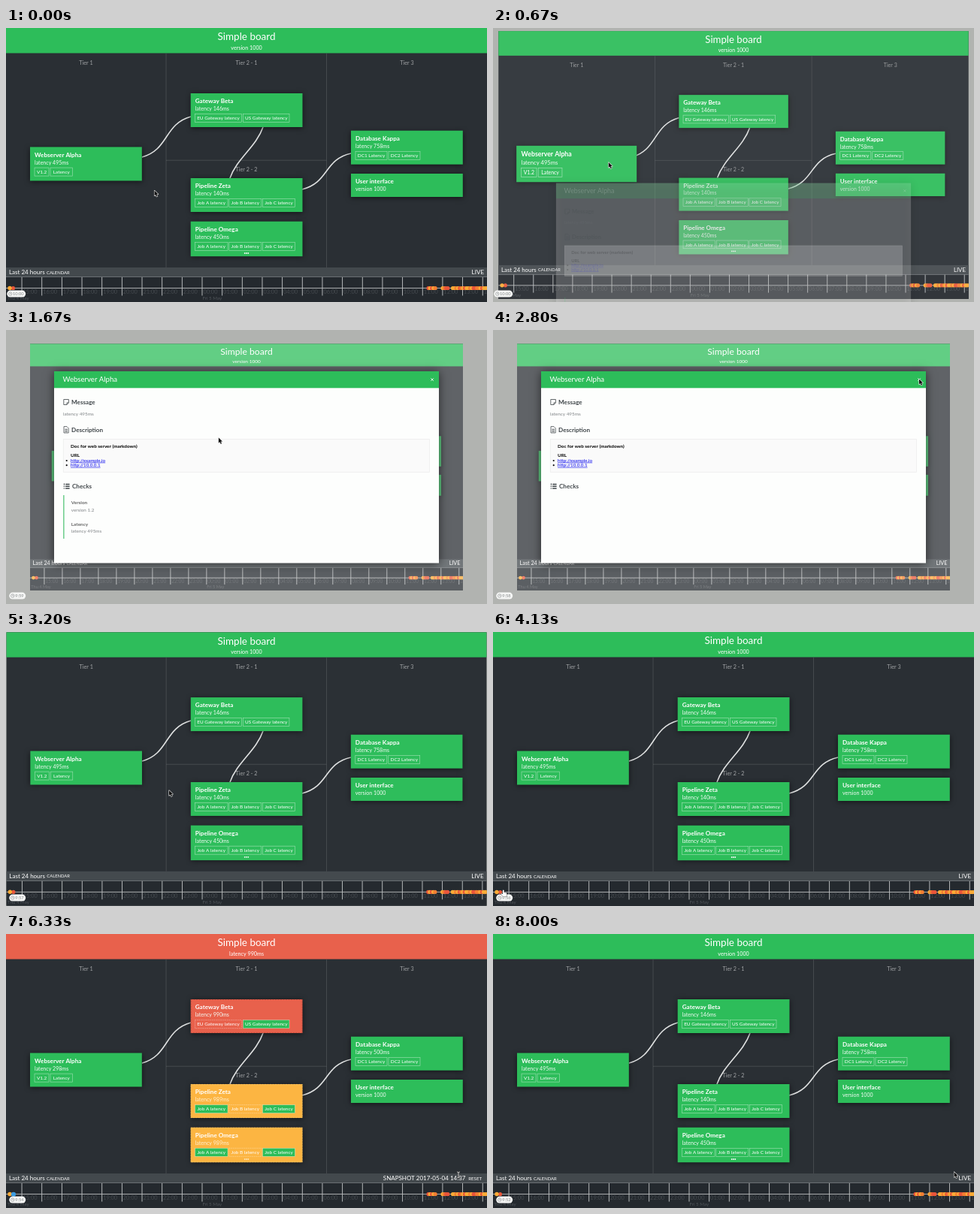
These frames come from a looping animation (640x365 px, 8.07 s). An HTML page with a canvas:

```html
<!DOCTYPE html>
<html lang="en">
<head>
<meta charset="utf-8">
<title>Simple board</title>
<style>
html, body { margin: 0; width: 100%; height: 100%; overflow: hidden; background: #b1b3b0; }
canvas { display: block; width: 640px; height: 365px; }
</style>
</head>
<body>
<canvas id="stage"></canvas>
<script>
const W = 640, H = 365, LOOP = 8070;
const OPEN = 587, CLOSE = 2815, PICK = 4420, RESET = 7060;
const HOVER_IN = 300, HOVER_OUT = 1150, CHECKS_OUT = 2700;
const OPEN_TIME = 500, CLOSE_TIME = 450, FADE = 250;
const GREEN = [45, 189, 90], RED = [232, 97, 76], AMBER = [252, 181, 66];
const SANS = 'Lato, sans-serif';

const canvas = document.getElementById('stage');
const ratio = window.devicePixelRatio || 1;
canvas.width = W * ratio;
canvas.height = H * ratio;
const c = canvas.getContext('2d');

const clamp = v => Math.max(0, Math.min(1, v));
const mix = (a, b, p) => a + (b - a) * p;
const rgb = a => `rgb(${a.join(',')})`;
const blend = (a, b, p) => rgb(a.map((v, i) => Math.round(mix(v, b[i], p))));
const smooth = p => p * p * (3 - 2 * p);

// cubic-bezier(.25, .1, .25, 1)
function ease(x) {
  if (x <= 0) return 0;
  if (x >= 1) return 1;
  const curve = (u, a, b) => 3 * u * (1 - u) * (1 - u) * a + 3 * u * u * (1 - u) * b + u * u * u;
  let lo = 0, hi = 1;
  for (let i = 0; i < 20; i++) {
    const mid = (lo + hi) / 2;
    if (curve(mid, .25, .25) < x) lo = mid; else hi = mid;
  }
  return curve(lo, .1, 1);
}

// Eased switch: rises from 0 to 1 at `on`, falls back at `off`
const toggle = (t, on, off, rise, fall = rise) =>
  t < off ? ease((t - on) / rise) : 1 - ease((t - off) / fall);

function scaled(s, x, y, draw) {
  c.save();
  c.translate(x, y);
  c.scale(s, s);
  c.translate(-x, -y);
  draw();
  c.restore();
}

function rect(x, y, w, h, color) {
  c.fillStyle = color;
  c.fillRect(x, y, w, h);
}

function text(s, x, y, size, color = '#fff', { bold = false, align = 'left', family = SANS } = {}) {
  c.font = `${bold ? 'bold ' : ''}${size}px ${family}`;
  c.textAlign = align;
  c.textBaseline = 'alphabetic';
  c.fillStyle = color;
  c.fillText(s, x, y);
}

function pathLine(d, color, width) {
  c.strokeStyle = color;
  c.lineWidth = width;
  c.stroke(new Path2D(d));
}

function dot(x, y, r, color) {
  c.fillStyle = color;
  c.beginPath();
  c.arc(x, y, r, 0, 7);
  c.fill();
}

function shadowed(blur, alpha, draw) {
  c.save();
  c.shadowColor = `rgba(0,0,0,${alpha})`;
  c.shadowBlur = blur * ratio;
  c.shadowOffsetY = ratio;
  draw();
  c.restore();
}

// Tags: [label, x, width, snapshot colour]
const jobs = [['Job A latency', 251.5, 43.5, GREEN], ['Job B latency', 296.8, 43, AMBER], ['Job C latency', 341.5, 43, GREEN]];
const cards = [
  { name: 'Webserver Alpha', x: 32, y: 158.5, h: 45, live: 'latency 495ms', past: 'latency 298ms', tone: GREEN,
    tags: [['V1.2', 38, 19, GREEN], ['Latency', 59, 29.5, GREEN]] },
  { name: 'Gateway Beta', x: 245.7, y: 87, h: 45, live: 'latency 146ms', past: 'latency 990ms', tone: RED,
    tags: [['EU Gateway latency', 251.5, 62, RED], ['US Gateway latency', 315.5, 61.5, GREEN]] },
  { name: 'Pipeline Zeta', x: 245.7, y: 200, h: 45, live: 'latency 140ms', past: 'latency 989ms', tone: AMBER, tags: jobs },
  { name: 'Pipeline Omega', x: 245.7, y: 257.7, h: 46.5, live: 'latency 450ms', past: 'latency 989ms', tone: AMBER, tags: jobs, more: true },
  { name: 'Database Kappa', x: 459, y: 136.7, h: 45, live: 'latency 758ms', past: 'latency 500ms', tone: GREEN,
    tags: [['DC1 Latency', 465, 42, GREEN], ['DC2 Latency', 509, 42, GREEN]] },
  { name: 'User interface', x: 459, y: 194, h: 31, live: 'version 1000', past: 'version 1000', tone: GREEN, tags: [] }
];

function drawCard(card, past, p) {
  const { x, y, h, tone } = card, alert = tone !== GREEN && past;
  shadowed(7, .6, () => rect(x, y, 148.8, h, blend(GREEN, tone, p)));
  if (alert) {
    c.setLineDash([2, 1.5]);
    c.strokeStyle = tone === RED ? 'rgba(130,45,40,.65)' : 'rgba(255,225,160,.5)';
    c.lineWidth = .6;
    c.strokeRect(x + .3, y + .3, 148.2, h - .6);
    c.setLineDash([]);
  }
  text(card.name, x + 6, y + 13.4, 8.15, '#fff', { bold: true });
  text(past ? card.past : card.live, x + 6, y + 23.4, 7.05, alert && tone === AMBER ? '#fff0d2' : '#f2fbf5');
  for (const [label, tx, w, color] of card.tags) {
    const ty = y + 27.6;
    if (tone !== GREEN) rect(tx, ty, w, 11, blend(GREEN, color, p));
    if (alert && color !== GREEN) c.setLineDash([1.5, 1]);
    c.strokeStyle = 'rgba(255,255,255,.55)';
    c.lineWidth = .6;
    c.strokeRect(tx, ty, w, 11);
    c.setLineDash([]);
    text(label, tx + w / 2, ty + 7.8, 6.4, '#fff', { align: 'center' });
  }
  if (card.more) for (let i = -1; i < 2; i++) dot(320 + i * 2.3, y + 42.3, .9, alert ? '#ffe7ba' : '#fff');
}

function drawTimeline(past) {
  rect(0, 319, W, 12.5, '#43494d');
  rect(0, 331.5, W, 33.5, '#24292e');
  rect(0, 331.3, W, .7, '#858a8d');
  for (let i = 0; i < 24; i++) {
    const x = 21 + i * 26.66;
    text(`${(15 + i) % 24}`.padStart(2, '0') + ':00', x + 1.5, 354, 7.4, '#454a4f');
    rect(x - .4, 332, .9, 24.5, '#c3c6c7');
  }
  text('Thu 4 May', 1.5, 362.3, 6.2, '#50555a');
  text('Fri 5 May', 261.5, 362.3, 6.2, '#50555a');
  rect(0, 346.1, W, .9, '#b9bcbd');

  const amber = '#fbab36', red = '#e9553a';
  dot(9.5, 346.5, 2.6, red);
  dot(5, 346.5, 2.7, amber);
  const groups = [[562, 'rarao'], [581, 'aorr'], [594.5, 'aaoaroaraaoarrooaraaa']];
  const tones = { r: red, a: amber, o: '#f27d32' };
  for (const [x, run] of groups) [...run].forEach((k, i) => dot(x + i * 2.3, 346.5, 2.6, tones[k]));
  if (past) dot(10, 346.8, 3.1, '#3a9be0');

  text('Last 24 hours', 4, 327.8, 8);
  text('CALENDAR', 54, 327.6, 5.85);
  if (past) {
    text('SNAPSHOT 2017-05-04 14:37', 611.5, 327.8, 8, '#fff', { align: 'right' });
    text('RESET', 633, 327.6, 6.1, '#fff', { align: 'right' });
  } else text('LIVE', 636, 327.8, 8, '#fff', { align: 'right' });
}

function drawBoard(past, p, hover, dim) {
  c.beginPath();
  c.rect(0, 0, W, H);
  c.clip();
  rect(0, 0, W, H, '#2a2f34');
  const divider = `rgba(255,255,255,${.16 * (1 - dim)})`;
  for (const x of [213, 426.5]) rect(x - .4, 34, .8, 285, divider);
  rect(213, 175.8, 213.5, .8, divider);
  rect(0, 0, W, 33.5, blend(GREEN, RED, p));
  const mid = { align: 'center' }, caption = `rgba(255,255,255,${mix(.57, .3, dim)})`;
  text('Simple board', 320, 16.4, 13.5, '#fff', mid);
  text(past ? 'latency 990ms' : 'version 1000', 320, 28.7, 7.2, '#fff', mid);
  text('Tier 1', 106.5, 48.6, 7.2, caption, mid);
  text('Tier 2 - 1', 320, 48.6, 7.2, caption, mid);
  text('Tier 2 - 2', 320, 191.4, 7.2, caption, mid);
  text('Tier 3', 533.5, 48.6, 7.2, caption, mid);
  for (const d of ['M181 172C217 162 210 128 246 118', 'M342 132C333 158 307 174 298 200', 'M394 215C430 206 423 175 459 167'])
    pathLine(d, '#dfe1e1', 1.6);
  cards.forEach((card, i) => {
    const grow = i === 0 ? 1 + .1 * hover : 1;
    scaled(grow, card.x + 74.4, card.y + card.h / 2, () => drawCard(card, past, p));
  });
  drawTimeline(past);
}

function drawModal(withChecks) {
  shadowed(12, .6, () => rect(64, 55, 512, 255.5, '#fdfefd'));
  rect(64, 55, 512, 22.3, rgb(GREEN));
  text('Webserver Alpha', 75.5, 69.4, 9.6);
  pathLine('M565.4 64.4l3.4 3.4m0-3.4l-3.4 3.4', '#fff', .9);

  const ink = '#3e4448', grey = '#7f8386', bold = { bold: true };
  text('Message', 87, 98.8, 8.15, ink, bold);
  text('Description', 87, 135.8, 8.15, ink, bold);
  text('Checks', 88, 211, 8.15, ink, bold);
  pathLine('M76.8 92.5h6.6v4.4l-2.4 2.6h-4.2zM83.4 96.9h-2.4v2.6', ink, .8);
  pathLine('M77 128.6h4l2.2 2.2v6.2h-6.2zM78.4 132.2h3.4M78.4 133.8h3.4M78.4 135.4h3.4', ink, .75);
  pathLine('M79.2 205.5h5.4M79.2 208.3h5.4M79.2 211h5.4', ink, 1.4);
  pathLine('M77.4 204.3v2.4M76.6 208.3h1.7M76.6 211h1.7', ink, 1);

  text('latency 495ms', 76, 113.7, 6.35, grey);
  rect(76.3, 145.3, 487.2, 44, '#fafafa');
  c.strokeStyle = '#ebebeb';
  c.lineWidth = .7;
  c.strokeRect(76.3, 145.3, 487.2, 44);
  text('Doc for web server (markdown)', 86, 157.2, 6.35, '#000', bold);
  text('URL', 86, 169.4, 6.35, '#000', bold);
  [['http://example.io', 176], ['http://10.0.0.1', 182.2]].forEach(([link, y]) => {
    dot(80.7, y - 2, 1.1, '#111');
    text(link, 86, y, 6.25, '#0000ee');
    rect(86, y + .6, c.measureText(link).width, .6, '#0000ee');
  });

  if (!withChecks) return;
  rect(76.2, 220, 1.3, 58, '#56c67b');
  text('Version', 86.8, 232.3, 6.4, '#666', bold);
  text('version 1.2', 86.8, 242, 6.3, grey);
  text('Latency', 86.8, 260.8, 6.4, '#666', bold);
  text('latency 495ms', 86.8, 270.4, 6.3, grey);
}

function drawBadge(t) {
  const left = 600 - Math.floor(t / 1000);
  const label = `${Math.floor(left / 60)}:${`${left % 60}`.padStart(2, '0')}`;
  const x = left < 600 ? 4.2 : 1.2;
  c.fillStyle = '#f5f6f5';
  c.beginPath();
  c.roundRect(x, 349.6, 26.2 - x, 9, 4.5);
  c.fill();
  c.strokeStyle = '#8b8f90';
  c.lineWidth = .6;
  c.beginPath();
  c.arc(x + 4.6, 354.1, 2.3, 0, 7);
  c.stroke();
  pathLine(`M${x + 4.6} 352.7v1.5h1.2`, '#8b8f90', .6);
  text(label, 23.4, 356.3, 5.6, '#85898a', { align: 'right' });
}

// Pointer stops: [time, x, y]
const stops = [[0, 197.5, 216.5], [130, 197.5, 216.5], [500, 153.8, 179], [HOVER_OUT, 153.8, 179], [2550, 567, 65.5], [CLOSE, 567, 65.5],
  [3200, 217, 211], [3400, 190, 225], [4200, 10, 347], [4950, 10, 347], [6280, 602, 321], [6400, 602, 321],
  [6800, 622, 324], [7120, 622, 324], [7550, 613.5, 317]];

function pointerAt(t) {
  const i = stops.findIndex(s => s[0] > t);
  if (i < 0) return stops[stops.length - 1].slice(1);
  const a = stops[i - 1], b = stops[i], p = smooth((t - a[0]) / (b[0] - a[0]));
  return [mix(a[1], b[1], p), mix(a[2], b[2], p)];
}

function shape(d, fill, edge, width) {
  const path = new Path2D(d);
  c.lineJoin = 'round';
  c.strokeStyle = edge;
  c.lineWidth = width;
  c.stroke(path);
  c.fillStyle = fill;
  c.fill(path);
}

function drawPointer(t, past) {
  const [x, y] = pointerAt(t);
  const onReset = past && x > 614 && y > 320;
  c.save();
  c.translate(x, y);
  if ((y > 337 && x < 14) || onReset)
    shape('M-.8 -.5q.8-1 1.6 0v3l3 .6q1 .4.8 1.5l-.6 3.4h-4.5l-2.7-3.4q.2-1.2 1.4-.5l1 .8z', '#fff', '#333', .8);
  else if (past && x > 500 && y > 319.5) {
    const beam = 'M-1.8 -4q1.4 0 1.8 1q.4-1 1.8-1M0-3v6M-1.8 4q1.4 0 1.8-1q.4 1 1.8 1';
    pathLine(beam, '#333', 1.8);
    pathLine(beam, '#e5e5e5', .9);
  } else shape('M0 0v7l1.6-1.5 1.2 2.7 1.3-.6-1.2-2.6h2.2z', '#111', '#eee', 1.1);
  c.restore();
}

function drawTooltip() {
  shadowed(2, .4, () => rect(13, 334, 50, 12, '#eef2ec'));
  text('2017-05-04 14:37', 15.5, 342, 6.2, '#222', { family: '"Liberation Serif", serif' });
}

function render(t) {
  const q = toggle(t, OPEN, CLOSE, OPEN_TIME, CLOSE_TIME);
  const p = toggle(t, PICK, RESET, FADE);
  const hover = toggle(t, HOVER_IN, HOVER_OUT, FADE);
  const past = t >= PICK && t < RESET;

  c.setTransform(ratio, 0, 0, ratio, 0, 0);
  rect(0, 0, W, H, '#b1b3b0');
  scaled(1 - .1 * q, W / 2, H / 2, () => {
    drawBoard(past, p, hover, q);
    rect(0, 0, W, H, `rgba(255,255,255,${.25 * clamp(q * 1.15)})`);
  });
  const alpha = clamp((q - .06) / .82);
  if (alpha > 0) {
    c.save();
    c.globalAlpha = alpha;
    c.translate(0, H / 2 * (1 - q));
    scaled(.9 + .1 * q, W / 2, H / 2, () => drawModal(t < CHECKS_OUT));
    c.restore();
  }
  drawBadge(t);
  if (t > 4150 && t < 5000) drawTooltip();
  drawPointer(t, past);
}

const begin = performance.now();
function tick() {
  render((performance.now() - begin) % LOOP);
  requestAnimationFrame(tick);
}
tick();
</script>
</body>
</html>
```
